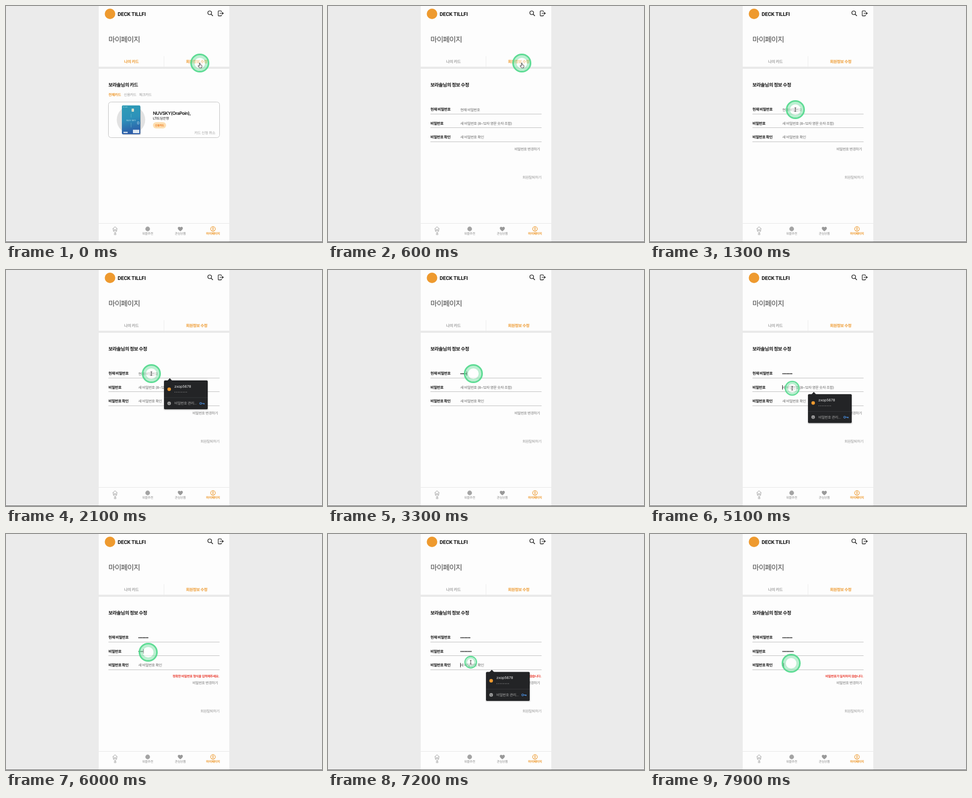
Write an HTML page that moves like this. It is 600 by 451 pixels and loops after 8 s.

```html
<!DOCTYPE html>
<html lang="ko">
<head>
<meta charset="utf-8">
<title>My page</title>
<style>
html, body { margin: 0; width: 100%; height: 100%; overflow: hidden; background: #ebebeb; }
svg { display: block; width: 100%; height: 100%; }
text {
  font-family: Inter, "Noto Sans CJK KR", "Noto Sans CJK", sans-serif;
  letter-spacing: -.055em; text-rendering: geometricPrecision;
}
.brand { font-family: Roboto, "Liberation Sans", sans-serif; font-weight: 700; letter-spacing: -.02em; }
.latin { letter-spacing: 0; }
</style>
</head>
<body>
<svg id="stage" viewBox="0 0 600 451"></svg>
<script>
const LOOP = 8000;
const ORANGE = '#ee9a2f', GREY = '#a4a4a4', INK = '#111';

const text = (x, y, size, fill, str, o = {}) =>
  `<text x="${x}" y="${y}" font-size="${size}" fill="${fill}" font-weight="${o.w || 400}"` +
  ` text-anchor="${o.a || 'start'}" class="${o.c || ''}" id="${o.id || ''}">${str}</text>`;
const rect = (x, y, w, h, fill, extra = '') =>
  `<rect x="${x}" y="${y}" width="${w}" height="${h}" fill="${fill}" ${extra}/>`;
const circle = (x, y, r, fill, extra = '') =>
  `<circle cx="${x}" cy="${y}" r="${r}" fill="${fill}" ${extra}/>`;
const stroke = (d, color, w, extra = '') =>
  `<path d="${d}" fill="none" stroke="${color}" stroke-width="${w}" ${extra}/>`;
const group = (id, body) => `<g id="${id}">${body}</g>`;

const fields = [
  { y: 198, label: '현재 비밀번호', hint: '현재 비밀번호', focus: 1400,
    keys: [2300, 2700, 2900, 3050, 3200, 3600, 3750, 3900] },
  { y: 224.3, label: '비밀번호', hint: '새 비밀번호 (8~12자 영문 숫자 조합)', focus: 4800,
    keys: [5300, 5500, 5700, 5900, 6150, 6300, 6450, 6600, 6750] },
  { y: 250.6, label: '비밀번호 확인', hint: '새 비밀번호 확인', focus: 7100, keys: [7800] }
];
const PITCH = 2.4;

const header =
  circle(197.5, 15, 10, ORANGE) +
  text(212, 19, 10, INK, 'DECK TILLFI', { c: 'brand' }) +
  circle(386.8, 13, 3.5, 'none', `stroke="${INK}" stroke-width="1.2"`) +
  stroke('M389.4 15.6l3.4 3.4', INK, 1.3) +
  stroke('M409 11.5v-1.2q0-1-1-1h-4q-1 0-1 1v7.6q0 1 1 1h4q1 0 1-1v-1.2M405.8 14h6.6m-2-2.2l2.2 2.2-2.2 2.2', INK, 1.1) +
  text(194.5, 68.5, 13.8, '#444', '마이페이지', { w: 300 });

const tabs =
  text(238, 108.6, 7.5, ORANGE, '나의 카드', { w: 600, a: 'middle', id: 'tabCards' }) +
  text(362, 108.6, 7.5, ORANGE, '회원정보 수정', { w: 700, a: 'middle' }) +
  rect(299.6, 96, .8, 20, '#e6e6e6') +
  rect(176, 116, 248, 4, '#e9e9e9');

const cardsPage =
  text(194.5, 153.8, 9, INK, '보라솔님의 카드', { w: 700 }) +
  text(194.5, 171.8, 6.8, ORANGE, '전체카드', { w: 700 }) +
  text(223.8, 171.8, 6.8, '#999', '신용카드') +
  text(252.8, 171.8, 6.8, '#999', '체크카드') +
  rect(194.5, 183.5, 211, 68, '#fefefe', 'rx="5" stroke="#c6c6c6"') +
  circle(237.3, 217.5, 27, '#e2e2e2') +
  rect(221, 191.5, 35, 55, '#000', 'rx="2" opacity=".18"') +
  rect(220, 190, 35, 55, 'url(#cardFill)', 'rx="2"') +
  rect(238.5, 196, 4.5, 6, '#d9dfc9', 'rx=".8"') +
  text(222, 194, 2.6, '#e6fbff', 'lti card', { c: 'latin' }) +
  text(237.5, 219.5, 4, '#c9eef5', 'NUV SKY', { a: 'middle', c: 'latin' }) +
  stroke('M237.5 206v7M237.5 223v9', '#8fd0dc', .4) +
  stroke('M249.5 221.5h3v4h-3z', '#d7edf6', .6) +
  rect(241, 236.5, 12, 6.5, '#dfe9f2') +
  rect(223, 240.5, 8, 2.2, '#dfe9f2') +
  text(279, 207.6, 8.6, INK, 'NUVSKY(OraPoin),', { w: 600 }) +
  text(279, 217, 6.4, '#222', 'LTI도담은행', { w: 500 }) +
  rect(279, 222, 25, 12, '#fddfb2', 'rx="6"') +
  text(291.5, 230, 5, '#f07a1c', '신용카드', { w: 700, a: 'middle' }) +
  text(397.5, 244.8, 7.1, GREY, '카드 신청 취소', { a: 'end' });

const fieldRow = (f, i) =>
  text(194.5, f.y + 2.4, 7.1, INK, f.label, { w: 700 }) +
  rect(194.5, Math.round(f.y + 8), 211, 1, '#c2c2c2') +
  text(251.2, f.y + 2.8, 6.9, '#666', f.hint, { id: 'hint' + i }) +
  group('dots' + i, f.keys.map((_, n) => circle(252.4 + PITCH * n, f.y + .2, 1, INK)).join(''));

const editPage =
  text(194.5, 153.8, 9, INK, '보라솔님의 정보 수정', { w: 700 }) +
  fields.map(fieldRow).join('') +
  text(405, 273.8, 6.05, '#ea3b2e', '', { w: 700, a: 'end', id: 'error' }) +
  group('actions',
    text(402.3, 275.6, 6.8, GREY, '비밀번호 변경하기', { w: 600, a: 'end' }) +
    text(405.3, 329.8, 6.95, '#979797', '회원탈퇴하기', { w: 500, a: 'end' })) +
  rect(0, 0, .9, 8.4, INK, 'id="caret"');

const nav =
  rect(176, 415, 248, 1, '#e8e8e8') +
  stroke('M202.4 426l4.6-4.2 4.6 4.2M203.8 425v5.4h2v-3h2.4v3h2V425', GREY, 1, 'stroke-linejoin="round"') +
  circle(269, 426, 4.4, GREY) +
  `<path d="M331 430.6c-3-2.4-4.8-4-4.8-6.1 0-2.8 3.4-3.5 4.8-1.2 1.4-2.3 4.8-1.6 4.8 1.2 0 2.1-1.8 3.7-4.8 6.1z" fill="#999"/>` +
  circle(393, 426, 4.6, 'none', `stroke="${ORANGE}"`) +
  circle(393, 424.8, 1.6, 'none', `stroke="${ORANGE}" stroke-width=".9"`) +
  stroke('M390 429.2q3-2.8 6 0', ORANGE, .9) +
  [[207, '홈'], [269, '워블추천'], [331, '관심상품'], [393, '마이페이지']].map(([x, s], i) =>
    text(x, 437.4, 6, i > 2 ? ORANGE : '#8d8d8d', s, { w: i > 2 ? 700 : 500, a: 'middle' })).join('');

// Password suggestion, placed relative to the middle of a field
const popup =
  rect(299, 13.5, 85.5, 57, '#000', 'rx="3" opacity=".1"') +
  '<path d="M306.5 13.5l4.5-4.7 4.5 4.7z" fill="#232426"/>' +
  rect(300, 13, 83, 55.3, '#232426', 'rx="2"') +
  circle(309.8, 29.8, 3.4, ORANGE) +
  text(319.7, 26.6, 6.8, '#f2f2f2', 'zxop5678', { c: 'latin' }) +
  Array.from({ length: 8 }, (_, i) => circle(320.8 + 3.15 * i, 35.3, .6, '#bbb')).join('') +
  rect(300, 45.6, 83, .7, '#3b3c3f') +
  circle(309.8, 56.8, 3.4, '#a5a5a5') +
  stroke('M308.3 57.5q1.5 1.6 3 0', '#232426', .7) +
  circle(308.6, 56, .5, '#232426') + circle(311, 56, .5, '#232426') +
  text(319.7, 59.4, 6.9, '#a8a8a8', '비밀번호 관리...') +
  circle(369.6, 57, 1.8, 'none', 'stroke="#4a8fe0" stroke-width="1.1"') +
  stroke('M371.4 57h5v2m-1.8-2v1.6', '#4a8fe0', 1.1);

const pointers =
  group('hand', `<path d="M-.9 .2q.9-.9 1.6 0v3.2l2.6.7q1 .4.8 1.5l-.6 3.6h-4.2l-2.6-3.5q-.2-1 .8-.7l1.6 1z" fill="#fff" stroke="${INK}" stroke-width=".75"/>`) +
  group('arrow', `<path d="M0 0v8.5l2-1.8 1.4 3 1.3-.6-1.3-2.9h2.6z" fill="${INK}" stroke="#fff" stroke-width=".6"/>`) +
  group('beam', stroke('M-1.5-3.8q1.5 0 1.5 1v5.6q0 1-1.5 1M1.5-3.8q-1.5 0-1.5 1M1.5 3.8q-1.5 0-1.5-1', INK, .8));

const stage = document.getElementById('stage');
stage.innerHTML =
  `<defs><linearGradient id="cardFill" x1="0" y1="0" x2=".15" y2="1">
    <stop offset="0" stop-color="#2f9cb6"/><stop offset=".5" stop-color="#2d92ba"/><stop offset="1" stop-color="#2d5da8"/>
  </linearGradient></defs>` +
  rect(0, 0, 600, 451, '#ebebeb') + rect(176, 0, 248, 451, '#fdfdfd') +
  header + tabs + group('cards', cardsPage) + group('edit', editPage) + nav +
  rect(0, 450, 600, 1, '#6a6a6a') +
  group('popup', popup) +
  group('cursor',
    group('ring',
      circle(0, 0, 10.1, '#fff', 'opacity=".45"') +
      circle(0, 0, 12.8, 'none', 'stroke="#79e2a6" stroke-width="5.4" opacity=".5"') +
      circle(0, 0, 16.6, 'none', 'stroke="#52da8d" stroke-width="3" opacity=".92"')) +
    pointers);

const el = {};
stage.querySelectorAll('[id]').forEach(n => { if (n.id) el[n.id] = n; });
const show = (node, on) => node.setAttribute('display', on ? 'inline' : 'none');
const move = (node, x, y, s = 1) => node.setAttribute('transform', `translate(${x} ${y}) scale(${s})`);

const path = [
  [0, 368, 109], [900, 368, 109], [1300, 276, 198], [4100, 276, 198], [4400, 283.5, 218.4],
  [4700, 270, 226], [6800, 270, 226], [7100, 271, 245], [7300, 271, 245], [7500, 268, 247], [LOOP, 268, 247]
];
const clicks = [100, 1400, 4800, 7100];
const hidden = [[2300, 4100], [5300, 6800], [7800, LOOP]];
const clamp = v => Math.max(0, Math.min(1, v));
const ease = u => u * u * (3 - 2 * u);

function cursorAt(t) {
  const i = path.findIndex(p => p[0] > t);
  const [t0, x0, y0] = path[i - 1], [t1, x1, y1] = path[i];
  const u = ease((t - t0) / (t1 - t0));
  return [x0 + (x1 - x0) * u, y0 + (y1 - y0) * u];
}

function pressScale(t) {
  const dip = clicks.reduce((m, c) =>
    Math.max(m, Math.min(clamp((t - c) / 100), clamp((c + 420 - t) / 200))), 0);
  return 1 - .33 * ease(dip);
}

function draw(t) {
  const editing = t >= 300;
  show(el.cards, !editing);
  show(el.edit, editing);
  el.tabCards.setAttribute('fill', editing ? GREY : ORANGE);

  const typed = fields.map(f => f.keys.filter(k => k <= t).length);
  fields.forEach((f, i) => {
    show(el['hint' + i], !typed[i]);
    [...el['dots' + i].children].forEach((dot, n) => show(dot, n < typed[i]));
  });

  const active = fields.filter(f => f.focus <= t).length - 1;
  const f = fields[active];
  if (f) {
    const n = typed[active];
    const since = t - (n ? f.keys[n - 1] : f.focus);
    show(el.caret, Math.floor(since / 500) % 2 === 0);
    move(el.caret, 251 + PITCH * n, f.y - 4.2);
    move(el.popup, 0, f.y);
  } else show(el.caret, false);
  show(el.popup, f && t >= f.focus + 80 && !typed[active]);

  const message = !typed[1] ? '' : typed[1] < 8
    ? '정확한 비밀번호 형식을 입력해주세요.' : '비밀번호가 일치하지 않습니다.';
  if (el.error.textContent !== message) el.error.textContent = message;
  move(el.actions, 0, message ? 11 : 0);

  const [x, y] = cursorAt(t);
  move(el.cursor, x, y);
  move(el.ring, 0, 0, pressScale(t));
  const visible = !hidden.some(([a, b]) => t >= a && t < b);
  show(el.hand, visible && y < 117);
  show(el.arrow, visible && y >= 117 && y < 188);
  show(el.beam, visible && y >= 188);
}

const start = performance.now();
function tick() {
  draw((performance.now() - start) % LOOP);
  requestAnimationFrame(tick);
}
tick();
</script>
</body>
</html>
```
